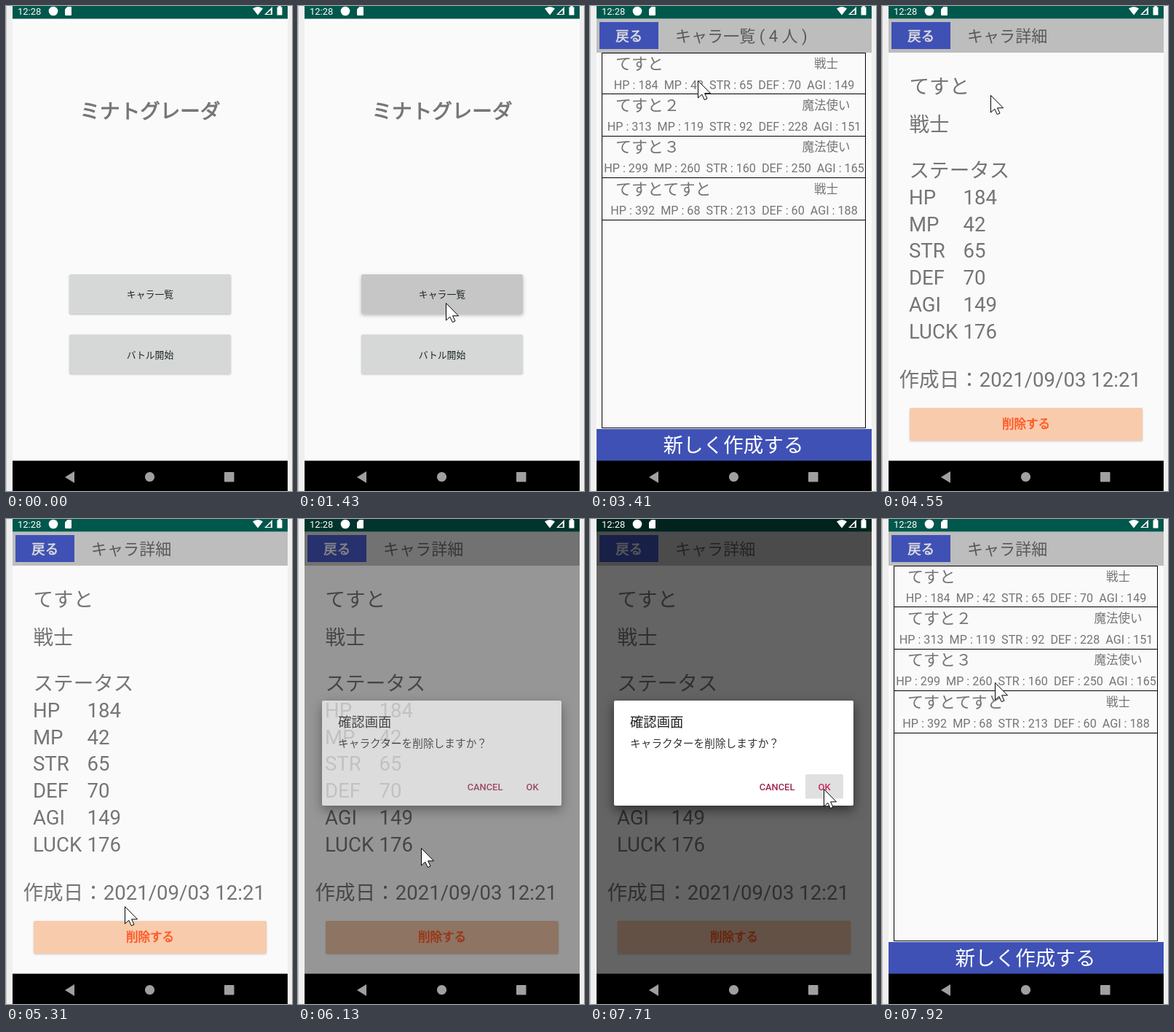
An HTML page for the animation above (7990 ms loop, 393x665 px).

```html
<!DOCTYPE html>
<html lang="ja">
<head>
<meta charset="utf-8">
<title>App demo</title>
<style>
html, body { margin: 0; width: 100%; height: 100%; overflow: hidden; background: #efefef; }
svg { display: block; font-family: Roboto, "Noto Sans CJK JP", "Noto Sans CJK", sans-serif; fill: #757575; }
text { white-space: pre; }
.raised { filter: drop-shadow(0 1px 1px #0003); }
.bold { stroke-width: .033em; }
</style>
</head>
<body>
<svg width="393" height="665" viewBox="0 0 393 665">
  <clipPath id="stage"><rect x="9" width="378" height="624"/></clipPath>
  <rect width="1" height="665" fill="#c4c4c4"/>
  <g clip-path="url(#stage)">
    <g id="home"></g>
    <g id="app">
      <g id="header"></g>
      <g id="list"></g>
      <g id="detail"></g>
    </g>
    <rect id="dim" x="9" width="378" height="624" fill="#000"/>
    <g id="dialog"></g>
  </g>
  <g fill="#fff">
    <text x="16" y="12" font-size="13">12:28</text>
    <circle cx="65" cy="7" r="6.3"/>
    <path d="M84.5 1H89q1 0 1 1V12q0 1-1 1H82q-1 0-1-1V4.5Z"/>
    <path d="M339 3.5Q346-1.5 353 3.5L346 12.5Z"/>
    <path d="M366 1V12H355ZM363.8 5.5 358 11H363.8Z" fill-rule="evenodd"/>
    <path d="M374.2 0H377.8V1.5H379.5V12.5H372.5V1.5H374.2Z"/>
  </g>
  <rect x="9" y="623.5" width="378" height="42" fill="#000"/>
  <g fill="#a0a0a0">
    <path d="M94 638V654L81 646Z"/>
    <circle cx="197.5" cy="645.7" r="6.6"/>
    <rect x="300" y="639" width="13.5" height="13.5" rx="1"/>
  </g>
  <path id="cursor" d="M.5.5V24L5.8 19.2 9.3 26.7 13 25 9.6 17.8H17.5Z" fill="#fff" stroke="#000"/>
</svg>
<script>
const LOOP = 7990, START = 120, STEP = 68.42;
// Sizes in scalable units, turned into pixels
const sp = size => size * .919;
const $ = id => document.getElementById(id);

const rect = (x, y, w, h, fill, extra = '') =>
  `<rect x="${x}" y="${y}" width="${w}" height="${h}" fill="${fill}" ${extra}/>`;
const text = (x, y, size, content, extra = '') =>
  `<text x="${x}" y="${y}" font-size="${size}" ${extra}>${content}</text>`;
const raised = (id, ...box) => rect(...box, `id="${id}" rx="2" class="raised"`);
const centered = 'text-anchor="middle" ';
const bold = color => `class="bold" fill="${color}" stroke="${color}"`;
const backdrop = rect(9, 0, 378, 624, '#fafafa') + rect(9, 0, 378, 17.5, '#00574b');

const homeButton = (id, y, label) => raised(id, 87, y, 222, 54, '#d6d7d7')
  + text(198, y + 32, sp(14), label, centered + 'fill="#1d2725"');

$('home').innerHTML = backdrop
  + text(198, 154, sp(30), 'ミナトグレーダ', centered + bold('#757575'))
  + homeButton('listButton', 368, 'キャラ一覧')
  + homeButton('battleButton', 450.6, 'バトル開始');

$('header').innerHTML = backdrop
  + rect(9, 18, 378, 46, '#bdbdbd')
  + rect(13, 22, 81, 37, '#3f51b5')
  + text(53.7, 47.5, sp(20), '戻る', centered + bold('#ddd'))
  + text(117, 49, sp(24), '', 'id="title" fill="#595959"');

const characters = [
  ['てすと', '戦士', 184, 42, 65, 70, 149],
  ['てすと２', '魔法使い', 313, 119, 92, 228, 151],
  ['てすと３', '魔法使い', 299, 260, 160, 250, 165],
  ['てすとてすと', '戦士', 392, 68, 213, 60, 188],
];
const labels = ['HP', 'MP', 'STR', 'DEF', 'AGI', 'LUCK'];

$('list').innerHTML = rect(16.5, 64.5, 362, 514, 'none', 'stroke="#000"')
  + characters.map(([name, job, ...stats], i) => {
    const y = 64 + 57.4 * i;
    const line = stats.map((value, j) => `${labels[j]} : ${value}`).join('  ');
    return text(35, y + 22.5, sp(24), name)
      + text(324.5, y + 20.5, sp(18), job, centered)
      + text(198, y + 49.5, sp(17.6), line, centered)
      + rect(17, Math.round(y + 56.4), 362, 1, '#000');
  }).join('')
  + rect(9, 580, 378, 44, '#3f51b5')
  + text(197, 612, sp(30), '新しく作成する', centered + 'fill="#fff"');

const [name, job, ...stats] = characters[0];
$('detail').innerHTML = text(37.5, 119.5, sp(30), name)
  + text(37.5, 171.5, sp(30), job)
  + text(37.5, 235, sp(30), 'ステータス')
  + [...stats, 176].map((value, i) => {
    const y = 272 + 36.7 * i;
    return text(37, y, sp(30), labels[i]) + text(111.5, y, sp(30), value);
  }).join('')
  + text(23.5, 521.5, sp(30), '作成日：2021/09/03 12:21')
  + raised('deleteButton', 38, 551, 320, 45, '#f8cbad')
  + text(198, 579, sp(18), '削除する', centered + bold('#ff5722'));

$('dialog').innerHTML =
  rect(33, 249, 329, 144, '#fff', 'rx="2" style="filter:drop-shadow(0 6px 8px #0008)"')
  + text(55, 284.5, sp(20), '確認画面', 'fill="#212121"')
  + text(55, 313, sp(16), 'キャラクターを削除しますか？', 'fill="#333"')
  + rect(296, 350, 52, 33.5, '#e0e0e0', 'id="okPress" rx="2"')
  + text(257, 372, sp(14), 'CANCEL', centered + 'font-weight="500" fill="#a02850"')
  + text(322, 372, sp(14), 'OK', centered + 'id="ok" font-weight="500"');

const clamp = v => Math.max(0, Math.min(1, v));
const ramp = (step, from, to) => clamp((step - from) / (to - from));
const smooth = p => p * p * (3 - 2 * p);
const mix = (a, b, p) => a + (b - a) * p;
const mixColor = (a, b, p) => `rgb(${a.map((v, i) => mix(v, b[i], p))})`;
const zoom = s => `translate(198 322) scale(${s}) translate(-198 -322)`;

// Pointer moves: first step, last step, destination
const entry = [355, 650];
const moves = [
  [0, 7, 212, 422],
  [10, 15, 203, 407],
  [19, 26, 182, 287],
  [31, 39, 150, 112],
  [39, 48, 148, 102],
  [63, 79, 165, 575],
  [86, 90, 173, 327],
  [90, 102, 321, 370],
  [111, 114, 155, 224],
];
const pointerAt = step => moves.reduce(([x, y], [from, to, toX, toY]) => {
  const p = smooth(ramp(step, from, to));
  return [mix(x, toX, p), mix(y, toY, p)];
}, entry);

const show = (id, opacity) => $(id).setAttribute('opacity', opacity);

function draw(t) {
  const step = Math.floor((t - START) / STEP + .25);

  show('cursor', step < 0 ? 0 : 1);
  $('cursor').setAttribute('transform', `translate(${pointerAt(step).map(Math.round)})`);

  const press = ramp(step, 15, 18);
  $('listButton').setAttribute('fill', mixColor([214, 215, 215], [197, 198, 197], press));
  $('listButton').style.filter = `drop-shadow(0 ${1 + press}px ${1 + 1.5 * press}px #0004)`;

  const open = 1 - (1 - ramp(step, 22, 29)) ** 4;
  $('home').setAttribute('transform', zoom(mix(1, 1.05, open)));
  $('app').setAttribute('transform', zoom(mix(.85, 1, open)));
  show('app', ramp(step, 22, 24));

  const inDetail = step >= 63 && step < 112;
  show('list', inDetail ? 0 : 1);
  show('detail', inDetail ? 1 : 0);
  $('title').textContent = step < 63 ? 'キャラ一覧 ( 4 人 )' : 'キャラ詳細';

  const remove = ramp(step, 82, 85) * ramp(step, 90, 87);
  $('deleteButton').setAttribute('fill', mixColor([248, 203, 173], [229, 188, 160], remove));

  const dialog = ramp(step, 86, 89) * ramp(step, 113, 111);
  show('dim', dialog * .6);
  show('dialog', dialog);
  const confirm = ramp(step, 106, 109);
  show('okPress', confirm);
  $('ok').setAttribute('fill', mixColor([160, 40, 80], [204, 42, 102], confirm));
}

const begin = performance.now();
function tick() {
  draw((performance.now() - begin) % LOOP);
  requestAnimationFrame(tick);
}
tick();
</script>
</body>
</html>
```
